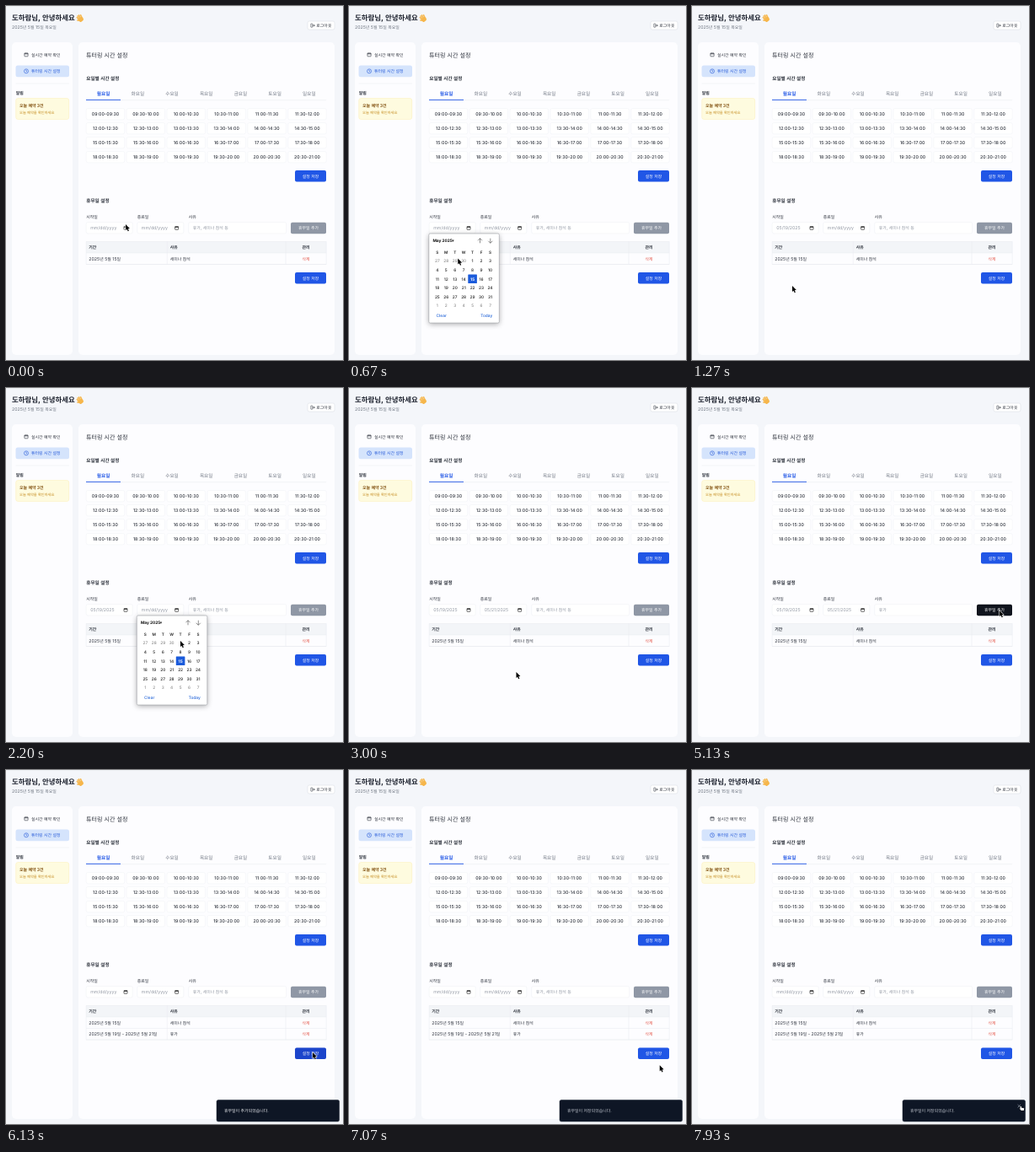
Recreate the animation shown at these times as an HTML page with a canvas. Size 400 by 420 pixels, loop 8 s.

```html
<!DOCTYPE html>
<html lang="ko">
<head>
<meta charset="utf-8">
<style>
html, body { margin: 0; width: 100%; height: 100%; overflow: hidden; background: #f4f6fa; }
canvas { display: block; width: 400px; height: 420px; }
</style>
</head>
<body>
<canvas id="stage"></canvas>
<script>
const LOOP = 8000;
const FONT = 'Inter, "Noto Sans CJK KR", "Noto Sans CJK", "Noto Sans KR", sans-serif';
const HANGUL = /[ㄱ-ㅎ가-힣]/;
const BLUE = '#2056e6', INK = '#2b303a', GRAY = '#6f7682', LINE = '#e7e9ee';
const LEFT = 95.2, RIGHT = 380.2, ROW = 13.5, SMALL = 5.25;
const canvas = document.getElementById('stage');
const ctx = canvas.getContext('2d');
const dpr = window.devicePixelRatio || 1;
canvas.width = 400 * dpr;
canvas.height = 420 * dpr;

const clamp = v => Math.min(1, Math.max(0, v));
const ramp = (t, from, to) => clamp((t - from) / (to - from));
const ease = p => p * p * (3 - 2 * p);

// Pointer glides: begin, end and where it comes to rest
const glides = [
  { from: 210, to: 1070, x: 119, y: 332 },
  { from: 1270, to: 1730, x: 202, y: 260 },
  { from: 1900, to: 2200, x: 207, y: 300 },
  { from: 2200, to: 2670, x: 198.5, y: 337 },
  { from: 3000, to: 3200, x: 262, y: 260 },
  { from: 4430, to: 5100, x: 365, y: 264 },
  { from: 5680, to: 6120, x: 364, y: 335 },
  { from: 6950, to: 7200, x: 374, y: 367 },
  { from: 7350, to: 7600, x: 390, y: 399 }
];

function pointerAt(t) {
  const at = { x: 142, y: 259 };
  for (const g of glides) {
    const p = ease(ramp(t, g.from, g.to));
    at.x += (g.x - at.x) * p;
    at.y += (g.y - at.y) * p;
  }
  return at;
}

function box(x, y, w, h, r, fill, stroke, lw = 0.5) {
  ctx.beginPath();
  ctx.roundRect(x, y, w, h, r);
  if (fill) { ctx.fillStyle = fill; ctx.fill(); }
  if (stroke) { ctx.strokeStyle = stroke; ctx.lineWidth = lw; ctx.stroke(); }
}

function line(x1, y1, x2, y2, color = LINE, lw = 0.5) {
  ctx.strokeStyle = color;
  ctx.lineWidth = lw;
  ctx.beginPath();
  ctx.moveTo(x1, y1);
  ctx.lineTo(x2, y2);
  ctx.stroke();
}

function at(x, y, angle, paint) {
  ctx.save();
  ctx.translate(x, y);
  ctx.rotate(angle);
  paint();
  ctx.restore();
}

// Arrow pointing right before rotation, centred on x, y
function arrow(x, y, angle, size, color) {
  at(x, y, angle, () => {
    line(-size, 0, size, 0, color, 0.6);
    for (const side of [-1, 1]) line(size * 0.1, size * 0.9 * side, size, 0, color, 0.6);
  });
}

// Hangul is drawn a little smaller so that its width suits the Latin runs
function text(str, x, y, size, color, weight = 400, align = 'left') {
  const runs = str.match(/[ㄱ-ㅎ가-힣]+|[^ㄱ-ㅎ가-힣]+/g).map(s => {
    const font = `${weight} ${size * (HANGUL.test(s) ? 0.94 : 1)}px ${FONT}`;
    ctx.font = font;
    return { s, font, w: ctx.measureText(s).width };
  });
  if (align === 'center') x -= runs.reduce((sum, r) => sum + r.w, 0) / 2;
  ctx.fillStyle = color;
  for (const r of runs) {
    ctx.font = r.font;
    ctx.fillText(r.s, x, y);
    x += r.w;
  }
}

function button(label, x, y, w, fill) {
  box(x, y, w, ROW, 2, fill);
  text(label, x + w / 2, y + 8.6, SMALL, '#fff', 500, 'center');
}

function wave() {
  at(88, 14.5, -0.6, () => {
    ctx.lineCap = 'round';
    for (let i = 0; i < 4; i++) {
      const x = 1.5 * i - 2.2;
      line(x, 0, x * 1.15, -4 + 0.5 * (i - 1.5) ** 2, '#f6b64b', 1.4);
    }
    line(-2, 2, -4, 0.2, '#f6b64b', 1.5);
    box(-3, -1, 6, 5.2, 2.2, '#f6b64b');
  });
}

function calendarIcon(x, y, color, size) {
  box(x - size, y - size * 0.85, size * 2, size * 1.9, 0.5, null, color, 0.6);
  line(x - size, y - size * 0.4, x + size, y - size * 0.4, color, size * 0.4);
}

function clockIcon(x, y, color) {
  box(x - 2.5, y - 2.5, 5, 5, 2.5, null, color, 0.6);
  line(x, y - 1.6, x, y + 0.2, color, 0.6);
  line(x, y, x + 1.2, y + 0.6, color, 0.6);
}

function frame() {
  ctx.fillStyle = '#f4f6fa';
  ctx.fillRect(0, 0, 400, 420);
  line(0, 0.3, 400, 0.3, '#e9ebef', 0.7);
  text('도하람님, 안녕하세요', 7, 17, 9, '#1f2430', 700);
  wave();
  text('2025년 5월 15일 목요일', 7, 26.6, SMALL, GRAY);

  box(358, 18, 32, 10, 2, '#fff', '#d6dae1');
  box(361.8, 21, 2, 4.2, 0.3, null, INK, 0.5);
  arrow(365, 23.1, 0, 1.4, INK);
  text('로그아웃', 368.3, 25, SMALL, INK, 500);

  box(7, 43, 72, 371, 5, '#fdfdff');
  box(86, 43, 304, 371, 5, '#fdfdff');
}

function sidebar() {
  calendarIcon(24, 57.6, INK, 2.1);
  text('실시간 예약 확인', 30, 59.7, SMALL, INK, 500);
  box(11.5, 70.5, 63.5, 13.7, 2.5, '#d5e4fc');
  clockIcon(24, 77.3, '#2458d8');
  text('튜터링 시간 설정', 30, 79.3, SMALL, '#2458d8', 500);
  line(11.5, 92, 75, 92);
  text('알림', 11.7, 104.7, SMALL, INK, 600);
  box(11.7, 109.5, 63, 25, 2.5, '#fefbdf', '#fcefb6');
  text('오늘 예약 3건', 16, 119.6, SMALL, '#80500f', 600);
  text('오늘 예약을 확인하세요', 16, 128.4, 4.5, '#c48a1c');
}

const clock = n => String(n >> 1).padStart(2, '0') + (n % 2 ? ':30' : ':00');

function schedule() {
  text('튜터링 시간 설정', 95, 60.6, 7.5, INK, 500);
  text('요일별 시간 설정', LEFT, 88, 6, INK, 600);
  line(LEFT, 111.7, RIGHT, 111.7);
  [...'월화수목금토일'].forEach((day, i) =>
    text(day + '요일', 115.6 + i * 40.7, 106.2, 6, i ? GRAY : BLUE, i ? 400 : 600, 'center'));
  line(95, 111.4, 136, 111.4, BLUE, 0.9);

  for (let i = 0; i < 24; i++) {
    const x = LEFT + (i % 6) * 47.9, y = 121.5 + Math.floor(i / 6) * 17;
    box(x, y, 45.5, 13.4, 2, '#fff', '#eff0f4');
    text(`${clock(18 + i)}-${clock(19 + i)}`, x + 22.8, y + 8.5, SMALL, INK, 500, 'center');
  }
  button('설정 저장', 343, 195, 37, BLUE);
}

function field(label, x, w, value, focused) {
  text(label, x, 252.2, SMALL, INK);
  box(x, 256.5, w, ROW, 2, '#fff', focused ? '#5b8ff5' : '#eceef2', focused ? 1 : 0.5);
  text(value, x + 5, 265.2, SMALL, '#9298a3');
}

function dateField(label, x, value) {
  field(label, x, 55, value || 'mm/dd/yyyy');
  calendarIcon(x + 46.8, 263.2, '#111', 2);
}

function table(rows) {
  const top = 279.5, bottom = top + ROW * (rows.length + 1);
  box(LEFT, top, RIGHT - LEFT, ROW, 0, '#f3f5f8');
  box(LEFT, top, RIGHT - LEFT, bottom - top, 0, null, LINE);
  for (const x of [191.3, 332]) line(x, top, x, bottom);
  [['기간', '사유', '관리'], ...rows].forEach(([when, why, action], i) => {
    const y = top + ROW * i, weight = i ? 400 : 600;
    text(when, 98.3, y + 8.7, SMALL, INK, weight);
    text(why, 194.7, y + 8.7, SMALL, INK, weight);
    text(action, 356, y + 8.7, SMALL, i ? '#e4594c' : INK, weight, 'center');
    line(LEFT, y + ROW, RIGHT, y + ROW);
  });
  return bottom;
}

function holidays(t, over) {
  const added = t >= 5330;
  const focused = t >= 3400 && t < 5070;
  const steps = ['', 'ㅎ', '휴', '휴ㄱ', '휴가'];
  const reason = added ? '' : steps[Math.ceil(4 * ramp(t, 3920, 4200))];
  text('휴무일 설정', LEFT, 233, 6, INK, 600);
  dateField('시작일', LEFT, t >= 1130 && !added && '05/19/2025');
  dateField('종료일', 155.8, t >= 2930 && !added && '05/21/2025');
  field('사유', 216.7, 116, reason || '휴가, 세미나 참석 등', focused);
  const ready = reason && over(338, 256, 42, 14);
  button('휴무일 추가', 338, 256.7, 42, ready ? '#10141d' : '#8f97a5');

  const rows = [['2025년 5월 15일', '세미나 참석', '삭제']];
  if (added) rows.push(['2025년 5월 19일 - 2025년 5월 21일', '휴가', '삭제']);
  const y = table(rows) + 9.6;
  button('설정 저장', 343, y, 37, over(343, y, 37, ROW) ? '#1c45cb' : BLUE);
}

function picker(x) {
  const col = i => x + 10 + (i % 7) * 10.45;
  const row = i => 304.4 + Math.floor(i / 7) * 10.55;
  ctx.save();
  ctx.shadowColor = 'rgba(0,0,0,.33)';
  ctx.shadowBlur = 6 * dpr;
  ctx.shadowOffsetY = 1.5 * dpr;
  box(x, 270, 83.5, 106, 1.5, '#fff');
  ctx.restore();
  box(x, 270, 83.5, 106, 1.5, null, '#8d9096');
  text('May 2025', x + 4.6, 280, 4.8, '#111', 700);
  text('▾', x + 27.5, 280, 4.8, '#222');
  arrow(x + 60.7, 278.5, -Math.PI / 2, 2.8, '#444');
  arrow(x + 73, 278.5, Math.PI / 2, 2.8, '#444');
  [...'SMTWTFS'].forEach((d, i) => text(d, col(i), 293.7, 4.7, '#222', 600, 'center'));
  for (let i = 0; i < 42; i++) {
    const date = new Date(2025, 3, 27 + i);
    const day = date.getDate(), inMonth = date.getMonth() === 4, today = inMonth && day === 15;
    if (today) box(col(i) - 5.3, row(i) - 7.1, 10.6, 10.6, 0.5, '#1b5bdb');
    text(String(day), col(i), row(i), 4.8, today ? '#fff' : inMonth ? '#1c1c1c' : '#777',
      today ? 700 : inMonth ? 500 : 400, 'center');
  }
  text('Clear', x + 8.8, 368.8, 4.8, '#2264d8', 500);
  text('Today', x + 68.4, 368.8, 4.8, '#2264d8', 500, 'center');
}

function toast(t) {
  if (t < 5330) return;
  const y = 391.5 + 14 * (1 - ramp(t, 5330, 5400));
  const swap = ramp(t, 6630, 6730);
  box(250, y, 145.6, 25.6, 2, '#0e1625', '#1b2433');
  ctx.globalAlpha = 1 - swap;
  text('휴무일이 추가되었습니다.', 259, y + 14.4, SMALL, '#eef0f4');
  ctx.globalAlpha = swap;
  text('휴무일이 저장되었습니다.', 259, y + 14.4, SMALL, '#c3c8d1');
  ctx.globalAlpha = ramp(t, 7740, 7860);
  for (const side of [-1, 1]) line(388.3 - 1.7, 398.7 - 1.7 * side, 388.3 + 1.7, 398.7 + 1.7 * side, '#b4bac5', 0.6);
  ctx.globalAlpha = 1;
}

const ARROW = new Path2D('M0 0V7.1L1.6 5.7 2.7 8.2 3.9 7.7 2.8 5.2 4.9 5.1Z');
const HAND = new Path2D('M-.5 0H.7L1 1.8 4.2 2.3 3.8 5H.8L-1.4 2.6H-.1Z');

function glyph(path, fill, edge, lw) {
  ctx.lineJoin = 'round';
  ctx.lineWidth = lw;
  ctx.strokeStyle = edge;
  ctx.fillStyle = fill;
  ctx.stroke(path);
  ctx.fill(path);
}

function pointer(t, x, y, over) {
  if (t >= 3930 && t < 4430) return;
  at(x, y, 0, () => {
    if (t >= 3150 && over(218, 257, 114, 13)) {
      line(0, 0, 0, 7, '#222', 0.6);
      for (const end of [0, 7]) line(-1.3, end, 1.3, end, '#222', 0.6);
    } else if (t >= 7790) {
      glyph(HAND, '#fff', '#222', 0.7);
    } else {
      glyph(ARROW, '#000', '#fff', 1.1);
    }
  });
}

function draw(t) {
  const p = pointerAt(t);
  const over = (x, y, w, h) => p.x >= x && p.x <= x + w && p.y >= y && p.y <= y + h;
  ctx.setTransform(dpr, 0, 0, dpr, 0, 0);
  ctx.textRendering = 'geometricPrecision';
  frame();
  sidebar();
  schedule();
  holidays(t, over);
  if (t >= 70 && t < 1130) picker(94.8);
  if (t >= 1930 && t < 2930) picker(155.3);
  toast(t);
  pointer(t, p.x, p.y, over);
}

const start = performance.now();
function tick() {
  draw((performance.now() - start) % LOOP);
  requestAnimationFrame(tick);
}
tick();
</script>
</body>
</html>
```
